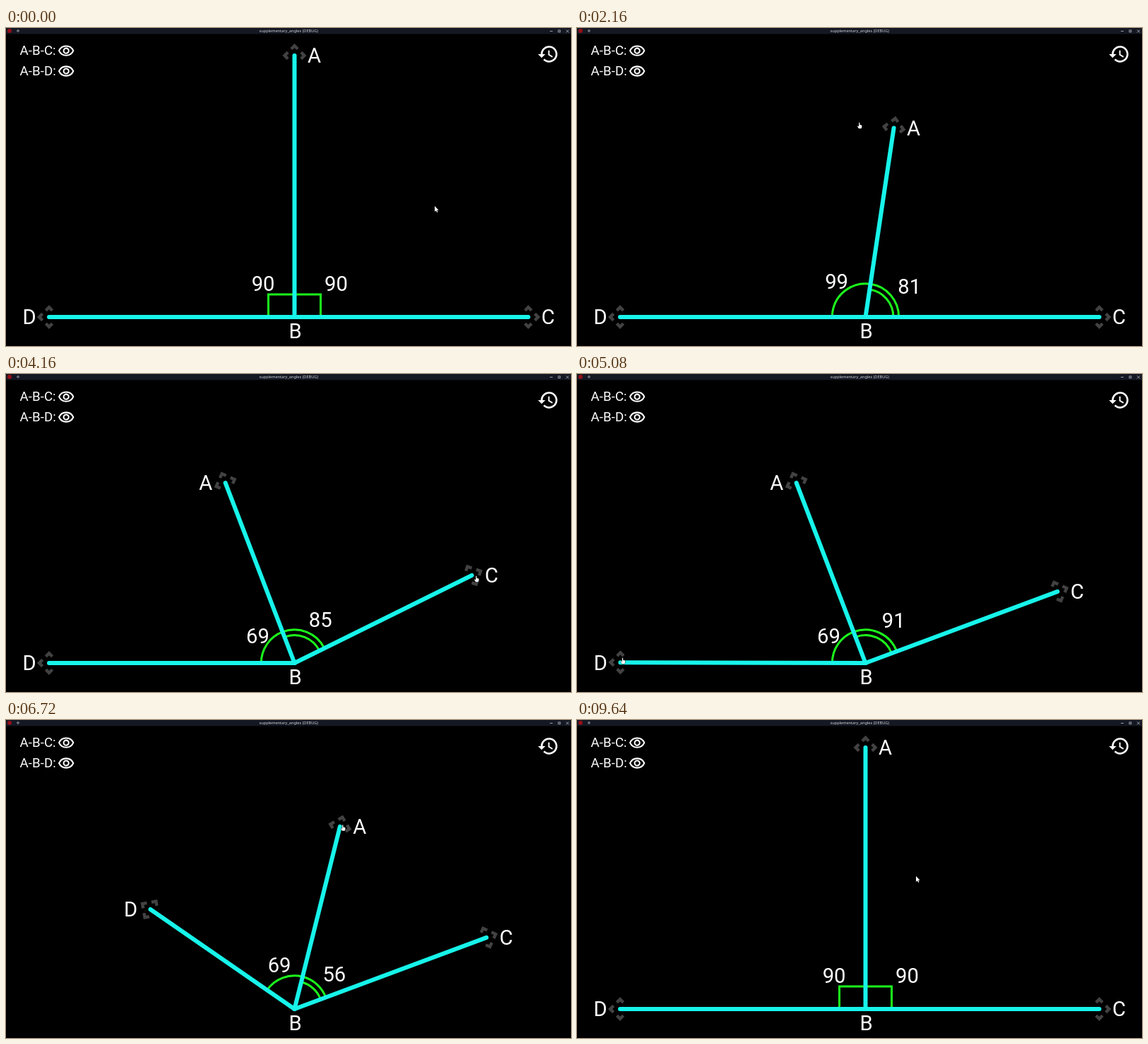
An HTML page with a canvas for the animation above (9.68 s loop, 800 by 450 pixels).

```html
<!DOCTYPE html>
<html lang="en">
<head>
<meta charset="utf-8">
<title>supplementary_angles</title>
<style>
  html, body { margin: 0; width: 100%; height: 100%; overflow: hidden; background: #000; }
  canvas { display: block; }
</style>
</head>
<body>
<canvas id="stage" width="800" height="450"></canvas>
<script>
const ctx = document.getElementById('stage').getContext('2d');
const LOOP = 9680, STEP = 40, RESET = 9120;
const LEAD = 70, TRAVEL = 500;
const B = { x: 408.5, y: 409 };
const CYAN = '#17f4ea', GREEN = '#1cfa1c', GREY = '#424242', WHITE = '#fff';
const LETTER = 29.2;

// A pose is an angle in degrees and a distance from B
const home = { A: [90, 370], C: [0, 331], D: [180, 347.5] };

// Each drag takes one arm through its poses at an even pace
const drags = [
  { name: 'A', start: 780, end: 2440, poses: [[122.6, 274], [53, 268], [111, 273]] },
  { name: 'C', start: 2840, end: 4600, poses: [[10.4, 298], [38, 270], [26.3, 280], [20.4, 290]] },
  { name: 'D', start: 5060, end: 5600, poses: [[145.35, 248]] },
  { name: 'A', start: 5950, end: 6700, poses: [[121.8, 273], [76, 266]] },
  { name: 'C', start: 7050, end: 7300, poses: [[0, 318]] },
  { name: 'D', start: 7910, end: 8350, poses: [[180, 315]] }
];

const tracks = {};
for (const name in home) tracks[name] = [[0, ...home[name]]];
for (const { name, start, end, poses } of drags) {
  const track = tracks[name];
  track.push([start, ...track.at(-1).slice(1)]);
  poses.forEach((pose, i) => track.push([start + (end - start) * (i + 1) / poses.length, ...pose]));
}

const historyIcon = new Path2D('M13 3a9 9 0 0 0-9 9H1l3.9 4L9 12H6a7 7 0 1 1 2.06 4.94l-1.42 1.42A9 9 0 1 0 13 3zm-1 5v5l4.28 2.54.72-1.21-3.5-2.08V8z');
const eyeIcon = new Path2D('M2.1 11.5C3.8 7.6 7.6 5 12 5s8.2 2.6 9.9 6.5C20.2 15.4 16.4 18 12 18s-8.2-2.6-9.9-6.5zM15.5 11.5a3.5 3.5 0 1 1-7 0a3.5 3.5 0 1 1 7 0z');
const arrow = new Path2D('M0 0V8L1.9 6.3 3.2 9 4.4 8.4 3.2 5.8H5.6z');
const hand = new Path2D('M-.6 0H.6V3L3.6 3.8V6.2L2.8 8.4H-.8L-2.8 5.2-2 4.6-.6 5.6z');

// Monotone cubic interpolation through keys of [time, ...values]
function sample(keys, t, col) {
  const last = keys.length - 1;
  if (t >= keys[last][0]) return keys[last][col];
  const i = keys.findIndex(key => key[0] > t) - 1;
  const rate = j => (keys[j + 1][col] - keys[j][col]) / (keys[j + 1][0] - keys[j][0]);
  const slope = j => {
    if (j === 0 || j === last) return 0;
    const p = rate(j - 1), q = rate(j);
    return p * q > 0 ? 2 * p * q / (p + q) : 0;
  };
  const h = keys[i + 1][0] - keys[i][0], u = (t - keys[i][0]) / h, v = 1 - u;
  return keys[i][col] * v * v * (1 + 2 * u) + keys[i + 1][col] * u * u * (3 - 2 * u)
    + h * u * v * (slope(i) * v - slope(i + 1) * u);
}

const radians = deg => deg * Math.PI / 180;
const polar = (deg, r) => ({ x: B.x + r * Math.cos(radians(deg)), y: B.y - r * Math.sin(radians(deg)) });

function arm(name, t) {
  const at = t >= RESET ? 0 : t;
  const angle = sample(tracks[name], at, 1);
  return { name, angle, ...polar(angle, sample(tracks[name], at, 2)) };
}

// The pointer's stops: resting places and drags, with eased travel in between
const rest = (start, end, x, y) => ({ start, end, at: () => ({ x, y }) });
const stops = [
  rest(0, 100, 607, 252),
  ...drags.map(({ name, start, end }) => ({
    start, end, drag: true,
    at(t) {
      const tip = arm(name, Math.min(t + Math.min(LEAD, t - start), end));
      return { x: tip.x + 2, y: tip.y - 4 };
    }
  })),
  rest(9050, 9150, 765, 37),
  rest(9640, LOOP, 480, 221)
];

function pointerAt(t) {
  const i = stops.findIndex(stop => stop.end > t), stop = stops[i];
  if (t >= stop.start) return { ...stop.at(t), drag: stop.drag };
  const prev = stops[i - 1], from = prev.at(prev.end), to = stop.at(stop.start);
  const u = Math.min(1, (t - prev.end) / Math.min(TRAVEL, stop.start - prev.end));
  const s = u * u * (3 - 2 * u);
  return { x: from.x + (to.x - from.x) * s, y: from.y + (to.y - from.y) * s };
}

function text(str, x, y, size, align = 'center', font = 'Roboto', color = WHITE) {
  ctx.font = `${size}px ${font}, sans-serif`;
  ctx.fontKerning = 'none';
  ctx.textAlign = align;
  ctx.fillStyle = color;
  ctx.fillText(str, x, y + size * 0.355);
}

function placed(x, y, scale, angle, draw) {
  ctx.save();
  ctx.translate(x, y);
  ctx.rotate(angle);
  ctx.scale(scale, scale);
  draw();
  ctx.restore();
}

function stroke(color, width, points) {
  ctx.strokeStyle = color;
  ctx.lineWidth = width;
  ctx.beginPath();
  points.forEach(p => ctx.lineTo(p.x ?? p[0], p.y ?? p[1]));
  ctx.stroke();
}

function titleBar() {
  const ink = '#b8bac0';
  ctx.fillStyle = '#141823';
  ctx.fillRect(0, 0, 800, 8.5);
  ctx.fillStyle = '#930f1a';
  ctx.beginPath();
  ctx.arc(5, 4, 3, 0, 7);
  ctx.fill();
  text('supplementary_angles (DEBUG)', 400.3, 4, 5.6, 'center', 'Noto Sans', '#d0d2d6');
  ctx.strokeStyle = ink;
  ctx.lineWidth = 0.8;
  ctx.beginPath();
  ctx.arc(17, 4, 1.3, 0, 7);
  ctx.stroke();
  ctx.strokeRect(782, 3, 2.8, 2.8);
  stroke(ink, 0.8, [[770, 4.5], [774, 4.5]]);
  stroke(ink, 0.8, [[793, 2.5], [797, 6.5]]);
  stroke(ink, 0.8, [[797, 2.5], [793, 6.5]]);
}

function controls() {
  ['A-B-C:', 'A-B-D:'].forEach((label, i) => {
    const y = 31.5 + 28.8 * i;
    text(label, 19.6, y, 18.75, 'left');
    placed(85.2, y + 0.7, 1.02, 0, () => {
      ctx.translate(-12, -11.5);
      ctx.strokeStyle = WHITE;
      ctx.lineWidth = 2;
      ctx.stroke(eyeIcon);
    });
  });
  placed(767, 37, 1.31, 0, () => {
    ctx.translate(-11.5, -12);
    ctx.fill(historyIcon);
  });
}

function handle({ x, y, angle }) {
  for (const turn of [-90, 0, 90]) {
    placed(x, y, 1, -radians(angle + turn),
      () => stroke(GREY, 4.4, [[9.3, -4.6], [13.9, 0], [9.3, 4.6]]));
  }
}

// Marks the angle from one arm up to another; returns its number and place
function angleMark(from, to, radii, textShift) {
  const size = Math.round(to.angle - from.angle);
  if (size === 90) {
    const flat = from.name === 'C';
    const p = polar(from.angle, flat ? 37 : 32), q = polar(to.angle, flat ? 32 : 37);
    stroke(GREEN, 3, [p, { x: p.x + q.x - B.x, y: p.y + q.y - B.y }, q]);
  } else {
    ctx.strokeStyle = GREEN;
    ctx.lineWidth = 3;
    for (const r of radii) {
      ctx.beginPath();
      ctx.arc(B.x, B.y, r, -radians(from.angle), -radians(to.angle), true);
      ctx.stroke();
    }
  }
  const mid = polar((from.angle + to.angle) / 2, 65);
  return { size, x: mid.x + textShift, y: mid.y - 1.3 };
}

function pointer(t, tips) {
  const p = pointerAt(t);
  const overHandle = tips.some(tip => Math.hypot(tip.x - p.x, tip.y - p.y) < 24);
  const shape = p.drag || overHandle ? hand : arrow;
  placed(p.x, p.y, 1, 0, () => {
    ctx.strokeStyle = '#000';
    ctx.lineWidth = 0.8;
    ctx.stroke(shape);
    ctx.fillStyle = WHITE;
    ctx.fill(shape);
  });
}

function draw(t) {
  ctx.fillStyle = '#000';
  ctx.fillRect(0, 0, 800, 450);
  titleBar();
  controls();

  const tips = ['A', 'C', 'D'].map(name => arm(name, t));
  const [a, c, d] = tips;
  tips.forEach(handle);
  const marks = [angleMark(c, a, [47.2, 39.4], 13), angleMark(a, d, [47.2], 1.5)];

  ctx.lineCap = ctx.lineJoin = 'round';
  tips.forEach(tip => stroke(CYAN, 6, [B, tip]));
  ctx.lineCap = 'butt';
  ctx.lineJoin = 'miter';

  marks.forEach(mark => text(mark.size, mark.x, mark.y, LETTER));
  tips.forEach(tip => text(tip.name, tip.x + (tip.x < B.x - 0.5 ? -28 : 28), tip.y, LETTER));
  text('B', B.x + 1.1, 429, LETTER);
  pointer(t, tips);
}

function tick() {
  const t = performance.now() % LOOP;
  draw(Math.floor(t / STEP) * STEP);
  requestAnimationFrame(tick);
}
tick();
</script>
</body>
</html>
```
